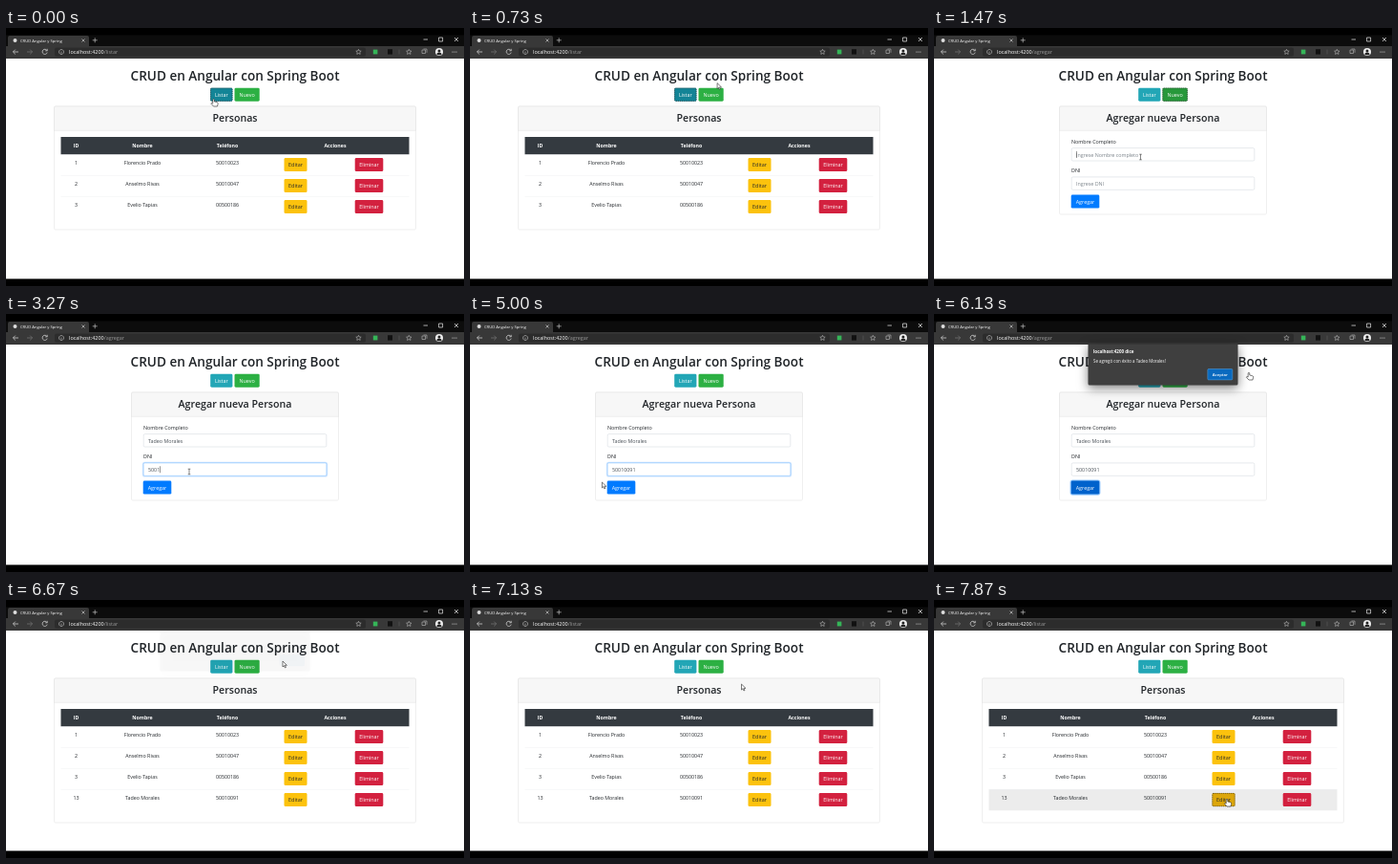
These frames come from a looping animation (480x270 px, 8 s). An HTML page with a canvas:

```html
<!DOCTYPE html>
<html lang="es">
<head>
<meta charset="utf-8">
<title>CRUD Angular y Spring</title>
<style>
html, body { margin: 0; width: 100%; height: 100%; overflow: hidden; background: #000; }
canvas { display: block; width: 480px; height: 270px; }
</style>
</head>
<body>
<canvas id="stage" width="480" height="270"></canvas>
<script>
const ctx = document.getElementById('stage').getContext('2d');
const LOOP = 8000;
const OPEN_FORM = 930, FOCUS_NAME = 1470, FOCUS_ID = 1930;
const SUBMIT = 5400, OPEN_DIALOG = 5530, ACCEPT = 6560, BACK_TO_LIST = 6600;
const NAME = 'Tadeo Morales', PHONE = '50010091';
const KEY_TIMES = [2870, 3000, 3200, 3270, 3400, 3540, 3670, 3930];
const PEOPLE = [
  ['1', 'Florencio Prado', '50010023'],
  ['2', 'Anselmo Rivas', '50010047'],
  ['3', 'Evelio Tapias', '00500186'],
  ['13', NAME, PHONE]
];
const COLORS = {
  info: ['#22a6b6', '#138496'],
  success: ['#2cb043', '#27983b'],
  warning: ['#fcc20d', '#dca60a'],
  danger: ['#d3213f', '#b91c36'],
  primary: ['#007bff', '#0062cc']
};
// Pointer path: time, x, y
const PATH = [
  [0, 217.5, 74], [70, 217.5, 74], [330, 226, 148], [600, 246, 96], [740, 260, 55],
  [870, 253, 69], [1000, 252, 69], [1330, 248, 64], [1460, 248, 64], [1470, 216.5, 135],
  [1600, 215, 137], [1730, 205, 162], [1930, 205, 162], [2130, 175, 178], [2600, 175, 178],
  [2670, 172, 173], [3200, 172, 173], [3270, 192, 165], [4530, 192, 165], [4800, 155, 172],
  [5000, 138.5, 176], [5130, 127, 178], [5330, 156, 181], [5600, 156, 181], [5930, 337, 56],
  [6130, 330, 61], [6270, 325, 62], [6470, 300, 63], [6600, 292, 64], [6670, 290, 64],
  [7070, 281, 52], [7400, 300, 247], [7670, 307, 208], [LOOP, 307, 208]
];

const ramp = (t, from, to) => Math.min(1, Math.max(0, (t - from) / (to - from)));
const inside = (p, x, y, w, h) => p.x >= x && p.x < x + w && p.y >= y && p.y < y + h;

function pointerAt(t) {
  const i = Math.max(1, PATH.findIndex(k => k[0] > t));
  const [t0, x0, y0] = PATH[i - 1], [t1, x1, y1] = PATH[i];
  const k = ramp(t, t0, t1);
  return { x: x0 + (x1 - x0) * k, y: y0 + (y1 - y0) * k, kind: 'arrow' };
}

function text(s, x, y, size, color, align = 'left', weight = 400) {
  ctx.font = `${weight} ${size}px "Open Sans", "Noto Sans", sans-serif`;
  ctx.textAlign = align;
  ctx.fillStyle = color;
  ctx.fillText(s, x, y);
  return ctx.measureText(s).width;
}

function rect(x, y, w, h, fill, radius = 0, stroke, line = 0.5) {
  ctx.beginPath();
  ctx.roundRect(x, y, w, h, radius);
  if (fill) { ctx.fillStyle = fill; ctx.fill(); }
  if (stroke) { ctx.strokeStyle = stroke; ctx.lineWidth = line; ctx.stroke(); }
}

function circle(x, y, r, fill) {
  ctx.beginPath();
  ctx.arc(x, y, r, 0, 7);
  ctx.fillStyle = fill;
  ctx.fill();
}

function stroke(d, color, width = 0.7) {
  ctx.strokeStyle = color;
  ctx.lineWidth = width;
  ctx.stroke(new Path2D(d));
}

function button(label, x, y, w, color, p, { focus = false, dark = false } = {}) {
  const hover = inside(p, x, y, w, 13.4);
  if (hover) p.kind = 'hand';
  rect(x - 0.3, y - 0.3, w + 0.6, 14, COLORS[color][hover || focus ? 1 : 0], 1.4);
  if (focus) {
    ctx.setLineDash([1, 1]);
    rect(x, y, w, 13.4, null, 1, '#333', 0.7);
    ctx.setLineDash([]);
  }
  text(label, x + w / 2, y + 8.7, 5.4, dark ? '#212529' : '#fff', 'center');
}

function card(x, w, bottom, title) {
  rect(x, 82, w, bottom - 82, '#fff', 1.4, '#dfdfdf');
  rect(x, 82, w, 25.3, '#f7f7f7', [1.4, 1.4, 0, 0], '#dfdfdf');
  text(title, 240, 97.8, 10.65, '#212529', 'center', 600);
}

function chrome(path) {
  rect(0, 7.5, 480, 12, '#0c0c0c');
  rect(2, 8, 85, 12, '#383838', [2, 2, 0, 0]);
  rect(0, 19, 480, 13, '#383838');
  circle(9.5, 13, 2, '#ddd');
  text('CRUD Angular y Spring', 15, 14.6, 4.15, '#fff', 'left', 500);
  stroke('M79.5 11.5l3 3m0-3l-3 3M90.7 12.8h5M93.2 10.3v5', '#ddd', 0.6);
  stroke('M437.5 12h4.5M453.6 10h4v4h-4zM470 10l4 4m0-4l-4 4', '#eee', 0.7);

  rect(51, 20.5, 326, 9.3, '#2c2c2c', 2);
  stroke('M13 25H7.5m2.3-2.4L7.4 25l2.4 2.4', '#ddd');
  stroke('M22 25h5.5m-2.3-2.4l2.4 2.4-2.4 2.4', '#777');
  stroke('M43 23.6a2.6 2.6 0 1 0 .2 2M43.2 21.8v2h-2', '#ddd');
  stroke('M58 22.5a2.5 2.5 0 1 0 .1 0M58 24.6v2', '#ccc', 0.6);
  const w = text('localhost:4200', 66, 26.9, 5.45, '#fff');
  text(path, 66 + w, 26.9, 5.45, '#999');
  const star = 'l.8 1.7 1.9.2-1.4 1.3.4 1.9-1.7-.9-1.7.9.4-1.9-1.4-1.3 1.9-.2z';
  stroke('M369.5 22.3' + star + 'M422.3 22.3' + star + 'M436 23h3.5v3.5h-3.5zm1.5-1h3.5v3.8', '#bbb', 0.6);
  rect(384.8, 22.6, 4.6, 4.8, '#35b558');
  rect(400, 22.2, 5, 5.4, '#111');
  stroke('M412 22.5v5', '#666', 0.5);
  circle(454, 25, 4, '#eee');
  circle(454, 24, 1.5, '#222');
  rect(451.5, 25.8, 5, 2.4, '#222', [2, 2, 1, 1]);
  for (const x of [468, 470, 472]) circle(x, 25, 0.55, '#ddd');
}

function listPage(t, p, rows) {
  card(50.5, 379, 145 + rows * 22, 'Personas');
  rect(57.5, 114, 365, 18.2, '#343a40');
  const columns = [73.5, 143, 232, 345];
  ['ID', 'Nombre', 'Teléfono', 'Acciones'].forEach((s, i) =>
    text(s, columns[i], 125.2, 5.25, '#fff', 'center', 700));
  PEOPLE.slice(0, rows).forEach((person, i) => {
    const y = 132.2 + i * 22;
    if (inside(p, 57.5, y, 365, 22)) rect(57.5, y, 365, 22, '#ececec');
    rect(57.5, y, 365, 0.4, '#dee2e6');
    person.forEach((s, c) => text(s, columns[c], y + 10.6, 5.3, '#212529', 'center'));
    button('Editar', 291.8, y + 4.2, 23.4, 'warning', p,
      { dark: true, focus: i === 3 && t > 7660 });
    button('Eliminar', 366, y + 4.2, 29, 'danger', p);
  });
}

function input(label, y, value, hint, focus, caret, p) {
  text(label, 144, y - 4.8, 5.4, '#212529');
  if (focus) rect(143.6, y - 0.4, 192.8, 14.2, null, 1.8, `rgba(0,123,255,${0.22 * focus})`, 1.5);
  rect(144.2, y, 191.6, 13.4, '#fff', 1.4, focus > 0.3 ? '#80bdff' : '#ced4da');
  const w = text(value || hint, 149, y + 9, 5.35, value ? '#495057' : '#7b838a');
  if (caret) rect(149 + (value ? w : 0), y + 3.4, 0.5, 7, '#333');
  if (inside(p, 144, y, 192, 13.4)) p.kind = 'text';
}

function formPage(t, p) {
  const name = NAME.slice(0, Math.ceil(ramp(t, 1540, 1730) * NAME.length));
  const typed = KEY_TIMES.filter(k => k <= t);
  const lastKey = typed.length ? typed[typed.length - 1] : FOCUS_ID;
  const onName = t >= FOCUS_NAME && t < FOCUS_ID;
  const onId = t >= FOCUS_ID && t < SUBMIT;
  const nameRing = ramp(t, FOCUS_NAME, 1620) * (1 - ramp(t, FOCUS_ID, 2080));
  const idRing = ramp(t, FOCUS_ID, 2080) * (1 - ramp(t, SUBMIT, 5550));
  const blink = Math.floor((t - lastKey) / 540) % 2 === 0;

  card(131.5, 217, 195, 'Agregar nueva Persona');
  input('Nombre Completo', 125.6, name, 'Ingrese Nombre completo', nameRing, onName, p);
  input('DNI', 155.9, PHONE.slice(0, typed.length), 'Ingrese DNI', idRing, onId && blink, p);
  const sent = t >= SUBMIT;
  if (sent) rect(143.4, 174.4, 30.2, 14.4, null, 2, 'rgba(0,123,255,.4)', 1.7);
  button('Agregar', 144, 174.9, 29, 'primary', sent ? { x: 150, y: 180 } : p);
  if (sent) p.kind = 'hand';
}

function dialog(alpha) {
  if (alpha <= 0) return;
  ctx.save();
  ctx.globalAlpha = alpha;
  ctx.shadowColor = 'rgba(0,0,0,.5)';
  ctx.shadowBlur = 11;
  ctx.shadowOffsetY = 3;
  rect(161.5, 31.5, 157, 43, '#3f3f3f', [0, 0, 1.5, 1.5]);
  ctx.shadowColor = 'transparent';
  text('localhost:4200 dice', 167, 41.2, 4.5, '#fff', 'left', 700);
  text(`Se agregó con éxito a ${NAME}!`, 167, 51.2, 4.42, '#fff');
  rect(286.8, 57.5, 26, 11.4, '#0a6abf', 1, '#5aa3dd');
  text('Aceptar', 299.8, 64.7, 4.3, '#fff', 'center', 600);
  ctx.restore();
}

function pointer({ x, y, kind }) {
  ctx.save();
  ctx.translate(x, y);
  ctx.lineJoin = 'round';
  if (kind === 'text') {
    stroke('M-1.3-2.8h2.6M0-2.8v5.6M-1.3 2.8h2.6', '#333', 0.6);
  } else {
    const shape = kind === 'hand'
      ? 'M-.8 5V.8Q0-.4.8.8V3l3 .7q1 .3 .9 1.5L4 8H0L-2.6 5.2q0-1.3 1.8-.2z'
      : 'M0 0v6l1.4-1.3 1 2.2 1-.4-1-2.2h2z';
    ctx.fillStyle = '#fff';
    ctx.fill(new Path2D(shape));
    stroke(shape, '#222', 0.6);
  }
  ctx.restore();
}

function draw(t) {
  const p = pointerAt(t);
  const form = t >= OPEN_FORM && t < BACK_TO_LIST;
  const modal = t >= OPEN_DIALOG && t < BACK_TO_LIST;
  const target = modal ? { x: -1, y: -1 } : p;

  rect(0, 0, 480, 270, '#000');
  rect(0, 32, 480, 230.5, '#fff');
  chrome(form ? '/agregar' : '/listar');
  text('CRUD en Angular con Spring Boot', 240, 54.8, 13.58, '#212529', 'center', 600);
  button('Listar', 214.5, 63, 22.6, 'info', target, { focus: t < 900 });
  button('Nuevo', 239.8, 63, 25.6, 'success', target, { focus: t >= 900 && t < 1530 });
  if (form) formPage(t, target);
  else listPage(t, target, t < OPEN_FORM ? 3 : 4);
  dialog(ramp(t, OPEN_DIALOG, 5660) * (1 - ramp(t, ACCEPT, 6674)));

  if (modal) p.kind = inside(p, 161.5, 31, 157, 43.5) ? 'arrow' : 'hand';
  pointer(p);
}

function tick() {
  draw(performance.now() % LOOP);
  requestAnimationFrame(tick);
}
tick();
</script>
</body>
</html>
```
